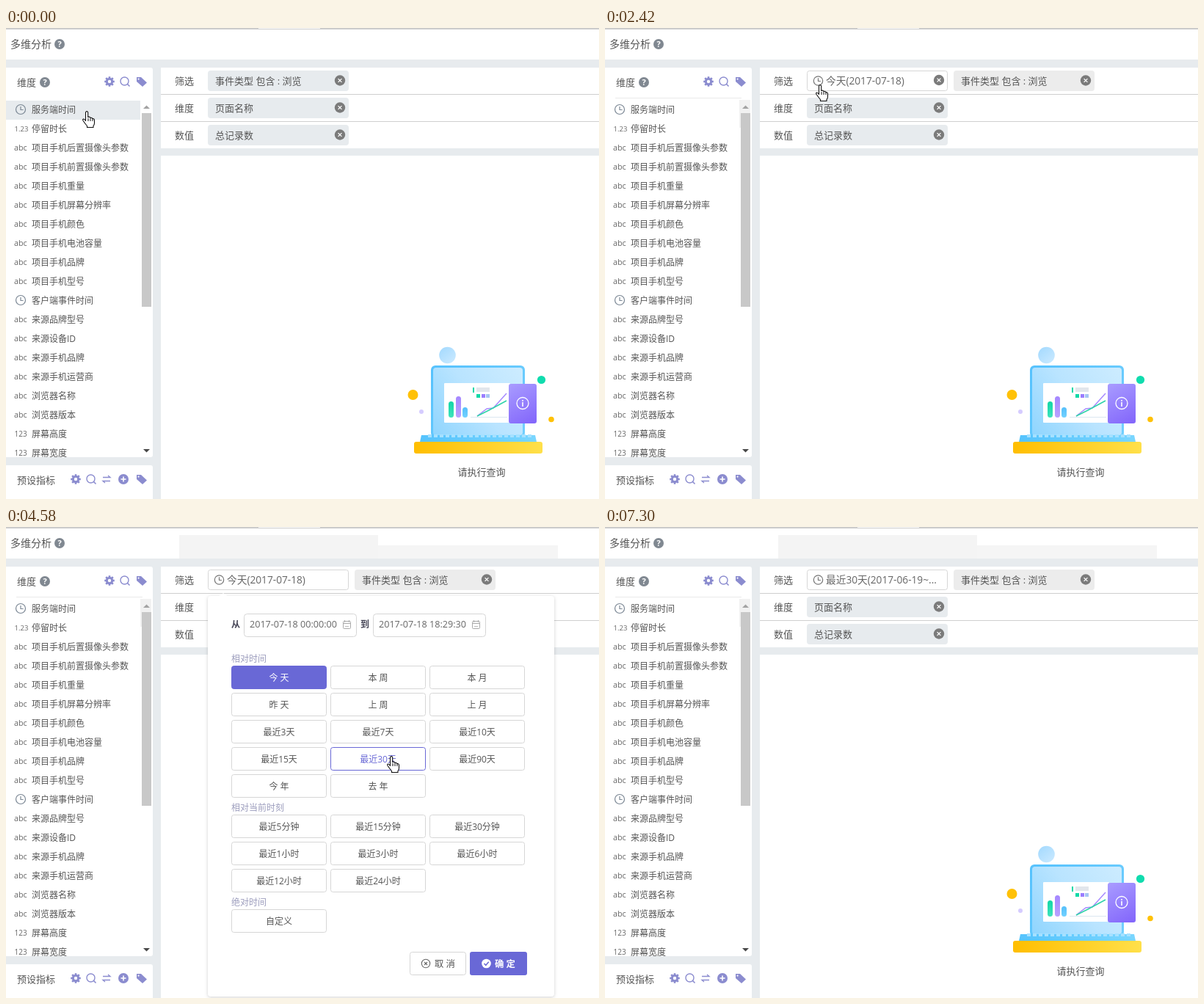
Write an HTML page with a canvas that moves like this. It is 808 px wide and 642 px high and loops after 7.85 s.

```html
<!DOCTYPE html>
<html lang="zh-CN">
<head>
<meta charset="utf-8">
<title>多维分析</title>
<style>
html, body { margin: 0; width: 100%; height: 100%; overflow: hidden; background: #fff; }
canvas { display: block; }
</style>
</head>
<body>
<canvas id="stage" width="808" height="642"></canvas>
<script>
const g = document.getElementById('stage').getContext('2d');
const LOOP = 7850;
const FONT = '"Open Sans", "Noto Sans CJK SC", "Noto Sans CJK", sans-serif';
const INK = '#555', LILAC = '#8b8ccf', PURPLE = '#6968d6', PALE = '#e7ebee', EDGE = '#d6d6d6';

// ---- helpers ----
function txt(s, x, cy, size = 12, color = INK, weight = 400, align = 'left') {
  g.font = `${weight} ${size}px ${FONT}`;
  g.textAlign = align;
  g.fillStyle = color;
  g.fillText(s, x, Math.round(cy + size * 0.37));
}
function rect(x, y, w, h, color) {
  g.fillStyle = color;
  g.fillRect(x, y, w, h);
}
function box(x, y, w, h, r, fill, line) {
  const o = line ? 0.5 : 0;
  g.beginPath();
  g.roundRect(x + o, y + o, w - 2 * o, h - 2 * o, r);
  if (fill) { g.fillStyle = fill; g.fill(); }
  if (line) { g.strokeStyle = line; g.lineWidth = 1; g.stroke(); }
}
function disc(x, y, r, color) {
  g.beginPath();
  g.arc(x, y, r, 0, 7);
  g.fillStyle = color;
  g.fill();
}
function ring(x, y, r, color, w = 1.2) {
  g.beginPath();
  g.arc(x, y, r, 0, 7);
  g.strokeStyle = color;
  g.lineWidth = w;
  g.stroke();
}
function line(color, w, ...p) {
  g.beginPath();
  for (let i = 0; i < p.length; i += 2) g.lineTo(p[i], p[i + 1]);
  g.strokeStyle = color;
  g.lineWidth = w;
  g.stroke();
}
function poly(color, ...p) {
  g.beginPath();
  for (let i = 0; i < p.length; i += 2) g.lineTo(p[i], p[i + 1]);
  g.fillStyle = color;
  g.fill();
}
function grad(x0, y0, x1, y1, ...stops) {
  const gr = g.createLinearGradient(x0, y0, x1, y1);
  stops.forEach((c, i) => gr.addColorStop(i / (stops.length - 1), c));
  return gr;
}
function cross(x, y, r, color, w) {
  line(color, w, x - r, y - r, x + r, y + r);
  line(color, w, x - r, y + r, x + r, y - r);
}

// ---- icons ----
function clock(x, y, r = 6.5, color = '#7b8794') {
  ring(x, y, r, color);
  line(color, 1.2, x, y - r * 0.6, x, y + 0.5, x + r * 0.55, y + 0.5);
}
function help(x, y) {
  disc(x, y, 7, '#808891');
  txt('?', x, y, 11, '#fff', 700, 'center');
}
function gear(x, y) {
  ring(x, y, 3.7, LILAC, 3);
  for (let i = 0; i < 8; i++) {
    const c = Math.cos(i * Math.PI / 4), s = Math.sin(i * Math.PI / 4);
    line(LILAC, 2.6, x + c * 4, y + s * 4, x + c * 6.8, y + s * 6.8);
  }
}
function search(x, y) {
  ring(x - 0.5, y - 0.5, 5.5, LILAC, 1.4);
  line(LILAC, 1.6, x + 3.5, y + 3.5, x + 6.5, y + 6.5);
}
function tag(x, y) {
  poly(LILAC, x - 6, y - 6, x, y - 6, x + 8, y + 1.5, x + 2, y + 7, x - 6, y);
  disc(x - 3.4, y - 3.4, 1.1, '#fff');
}
function swap(x, y) {
  line(LILAC, 1.3, x - 5, y - 2.5, x + 5, y - 2.5, x + 2, y - 5);
  line(LILAC, 1.3, x + 5, y + 2.5, x - 5, y + 2.5, x - 2, y + 5);
}
function plus(x, y) {
  disc(x, y, 7, LILAC);
  line('#fff', 1.6, x - 3.5, y, x + 3.5, y);
  line('#fff', 1.6, x, y - 3.5, x, y + 3.5);
}
function close(x, y) {
  disc(x, y, 7.2, '#7b7b7b');
  cross(x, y, 2.4, '#fff', 1.3);
}
function calendar(x, y) {
  box(x - 5, y - 5, 11, 11, 1, null, '#aaa');
  line('#aaa', 1, x - 5, y - 1.5, x + 6, y - 1.5);
  line('#aaa', 1, x - 2.5, y - 6, x - 2.5, y - 3);
  line('#aaa', 1, x + 3.5, y - 6, x + 3.5, y - 3);
  line('#bbb', 1, x - 2, y + 2.5, x + 3, y + 2.5);
}

// ---- cursors ----
const HAND = new Path2D('M4.5 13.5V2.2a1.6 1.6 0 0 1 3.2 0V8.5q2.8-1 3.2 1q2.6-.8 3 1.2q2.4-.4 2.6 1.6v4.2q0 2.5-1.5 3.8v2.2H6.5v-2Q3.5 17 1 13.2q-1-1.8 .6-2.2q1.4 0 2.9 2.5z');
const ARROW = new Path2D('M.5 .5V16.5L4.1 13L6.6 19L9 18L6.5 12.2H11.6Z');
function shape(path, x, y) {
  g.save();
  g.translate(x, y);
  g.lineJoin = 'round';
  g.fillStyle = '#fff';
  g.fill(path);
  g.strokeStyle = '#111';
  g.lineWidth = 1.1;
  g.stroke(path);
  g.restore();
}
const cursors = {
  hand(x, y) {
    shape(HAND, x - 6, y);
    for (const dx of [2, 5, 8]) line('#111', 1, x + dx, y + 10, x + dx, y + 14);
  },
  arrow(x, y) { shape(ARROW, x, y); },
  copy(x, y) {
    rect(x + 2, y + 16, 12, 8, '#fff');
    g.setLineDash([2, 1]);
    g.strokeStyle = '#222';
    g.lineWidth = 1;
    g.strokeRect(x + 2.5, y + 16.5, 11, 7);
    g.setLineDash([]);
    shape(ARROW, x, y);
  },
  deny(x, y) {
    ring(x, y, 8, '#fff', 4.5);
    line('#fff', 4.5, x - 5.5, y - 5.5, x + 5.5, y + 5.5);
    ring(x, y, 8, '#111', 2.4);
    line('#111', 2.4, x - 5.5, y - 5.5, x + 5.5, y + 5.5);
  },
  none() {}
};
const track = [
  [0, 'hand', 110, 113], [960, 'deny', 122, 109], [1110, 'deny', 163, 97], [1240, 'deny', 199, 87],
  [1380, 'copy', 227, 83], [1500, 'copy', 248, 80], [1900, 'arrow', 248, 80], [2290, 'arrow', 268, 78],
  [2420, 'hand', 293, 77], [2540, 'hand', 308, 77], [2700, 'hand', 321, 77],
  [3800, 'arrow', 366, 94], [3930, 'arrow', 406, 116], [4070, 'arrow', 466, 172], [4190, 'arrow', 521, 224],
  [4340, 'hand', 523, 246], [4460, 'hand', 524, 281], [4580, 'hand', 525, 312], [4730, 'hand', 526, 314],
  [5810, 'arrow', 601, 368], [5960, 'arrow', 636, 470], [6090, 'arrow', 667, 571], [6240, 'hand', 670, 591],
  [6920, 'arrow', 669, 591], [7060, 'arrow', 708, 592], [7190, 'arrow', 750, 593], [7300, 'none', 0, 0]
];
const at = (list, t) => list.findLast(e => e[0] <= t);

// ---- page ----
const fields = ['@服务端时间', '1.23 停留时长', '项目手机后置摄像头参数', '项目手机前置摄像头参数', '项目手机重量',
  '项目手机屏幕分辨率', '项目手机颜色', '项目手机电池容量', '项目手机品牌', '项目手机型号', '@客户端事件时间',
  '来源品牌型号', '来源设备ID', '来源手机品牌', '来源手机运营商', '浏览器名称', '浏览器版本', '123 屏幕高度', '123 屏幕宽度'];

function header(t) {
  rect(0, 0, 808, 642, PALE);
  rect(0, 0, 808, 43, '#fff');
  rect(0, 0, 808, 2, '#cbcbcb');
  rect(344, 0, 84, 1, '#fff');
  if (t >= 3280) rect(505, 25, t < 3400 ? 243 : 247, 18, '#f5f5f5');
  if (t >= 4190) rect(236, 11, 271, 32, '#f4f4f4');
  txt('多维分析', 6, 22, 14);
  help(73, 22);
}
function sidebar(t) {
  box(-4, 54, 204, 531, 3, '#fff');
  txt('维度', 15, 74, 13);
  help(53, 74);
  gear(141, 73);
  search(162, 73);
  tag(184, 73);
  if (t >= 960) rect(t < 1900 ? 23 : 14, 95, t < 1900 ? 112 : 172, 1, '#e9e9e9');
  if (t < 2020) rect(0, 99, 183, 26, t < 960 ? PALE : t < 1900 ? '#dfdfdf' : '#f2f2f2');

  g.save();
  g.beginPath();
  g.rect(0, 97, 200, 488);
  g.clip();
  fields.forEach((f, i) => {
    const y = 112 + i * 26;
    const m = f.match(/^([\d.]+) (.*)/);
    if (f[0] === '@') clock(20, y - 1);
    else if (m) txt(m[1], 11.5, y - 1, m[1].length > 3 ? 9.5 : 10, '#666');
    else txt('abc', 11, y - 1, 10.8, '#666');
    txt(m ? m[2] : f.replace('@', ''), 35, y);
  });
  g.restore();

  if (t >= 960) rect(183, 98, 15, 38, '#f1f1f1');
  rect(185, 116, 13, 264, '#c8c8c8');
  poly('#a3a3a3', 187, 110, 191.5, 105.5, 196, 110);
  poly('#484848', 187, 574, 196, 574, 191.5, 578.5);

  box(-4, 596, 204, 60, 3, '#fff');
  txt('预设指标', 15, 616, 13);
  gear(95, 615);
  search(116, 615);
  swap(137, 615);
  plus(160, 615);
  tag(184, 615);
}
function pill(x, y, label, fill = PALE) {
  box(x, y, 192, 28, 4, fill);
  txt(label, x + 10, y + 14, 13);
  close(x + 180, y + 13.5);
}
function filters(t) {
  rect(211, 54, 597, 110, '#fff');
  rect(211, 90, 597, 1, '#cfcfcf');
  rect(211, 127, 597, 1, '#cfcfcf');
  rect(211, 174, 597, 468, '#fff');
  ['筛选', '维度', '数值'].forEach((s, i) => txt(s, 230, 72 + i * 37, 13));
  pill(275, 95, '页面名称');
  pill(275, 132, '总记录数');
  const event = '事件类型 包含 : 浏览';
  if (t < 1900) return pill(275, 58, event);
  pill(475, 58, event, '#ececec');
  box(275, 58, 192, 28, 3, '#fff', EDGE);
  clock(290.5, 72, 6.2, '#777');
  txt(t < 5290 ? '今天(2017-07-18)' : '最近30天(2017-06-19~...', 301, 72, 13.7, '#666');
  if (t >= 2420 && t < 3800) close(455, 71);
}
function picture() {
  disc(601.5, 446, 11.3, grad(592, 436, 610, 457, '#a5dafe', '#c9e9ff'));
  disc(554.5, 500, 7, '#ffc107');
  disc(566, 523, 3, '#d5ccff');
  disc(729.5, 479.5, 5.6, '#10dcae');
  disc(743, 533.5, 3.8, '#ffc107');

  // laptop lid and window
  box(579, 460, 128, 98, 6, grad(579, 460, 707, 555, '#56c2fd', '#72cffe'));
  box(582, 463, 122, 92, 4, grad(582, 555, 704, 463, '#8fd5fe', '#b9e4ff', '#cdecff'));
  box(597, 484, 90, 54, 1, '#fff');

  // bars and lines
  box(603, 509, 7, 22, 3.5, grad(0, 509, 0, 531, '#12d6a6', '#3fe3bb'));
  box(613, 502, 7, 29, 3.5, grad(0, 502, 0, 531, '#a587ff', '#b9a2ff'));
  box(622, 517, 7, 14, 3.5, grad(0, 517, 0, 531, '#55bffb', '#72d2ff'));
  rect(636, 490, 2, 7, '#10d9a8');
  rect(641, 490, 18, 6, '#e2e6ec');
  rect(641, 499, 5, 5, '#10d9a8');
  rect(648, 499, 5, 5, '#9a7dff');
  rect(654, 499, 5, 5, '#a6c6f3');
  line('#dbe7f1', 1, 633, 530.5, 683, 530.5);
  line('#a78bff', 1.5, 642, 529, 655, 519, 664, 518, 682, 498);
  line('#2ed3a9', 1.5, 642, 529, 658, 521, 682, 508);

  // keyboard and desk
  poly(grad(564, 0, 723, 0, '#55c3fd', '#7ad6ff'), 566, 555, 721, 555, 723, 564, 564, 564);
  for (let x = 575; x < 714; x += 8) rect(x, 554, 5, 4, '#a6e1ff');
  box(556, 564, 175, 16, 3, grad(556, 0, 731, 0, '#ffbe00', '#ffe04a'));

  box(685, 485, 38, 54, 3, grad(685, 485, 715, 539, '#a99cff', '#8468fb'));
  ring(704, 511.5, 8, '#fff', 1.3);
  rect(703.2, 507, 1.6, 1.8, '#fff');
  rect(703.2, 510, 1.6, 6, '#fff');
  txt('请执行查询', 648, 605.5, 13, INK, 400, 'center');
}

// ---- overlays ----
function ghost(x, y) {
  const r = v => `rgba(226,226,226,${v})`;
  rect(x, y, 163, 20, grad(x, 0, x + 163, 0, r(0.85), r(0.72), r(0.25)));
  clock(x + 10, y + 9, 6.5, '#9a9a9a');
  txt('服务端时间', x + 24, y + 10.5, 12, '#888');
}
function dropMark() {
  rect(268, 45, 6, 6, INK);
  poly(INK, 264.5, 51, 277.5, 51, 271, 58.5);
}
function tooltip(alpha, scale) {
  g.save();
  g.globalAlpha = alpha;
  g.translate(371.5, 47);
  g.scale(scale, scale);
  g.translate(-371.5, -47);
  box(239, 12, 265, 34, 4, '#555');
  poly('#555', 366, 46, 377, 46, 371.5, 51);
  txt('2017-07-18 00:00:00~2017-07-18 18:29:30', 371.5, 29.5, 12.6, '#fff', 700, 'center');
  g.restore();
}

const groups = [
  ['相对时间', 180, 189, ['今 天', '本 周', '本 月', '昨 天', '上 周', '上 月', '最近3天', '最近7天', '最近10天',
    '最近15天', '最近30天', '最近90天', '今 年', '去 年']],
  ['相对当前时刻', 383, 392, ['最近5分钟', '最近15分钟', '最近30分钟', '最近1小时', '最近3小时', '最近6小时', '最近12小时', '最近24小时']],
  ['绝对时间', 512, 521, ['自定义']]
];
const hovers = [[0, ''], [4340, '上 周'], [4460, '最近7天'], [4580, '最近30天']];

function look(name, t) {
  const on = [PURPLE, PURPLE, '#fff'];
  if (name === '今 天') {
    if (t < 5290) return on;
    if (t < 5410) return ['#8e8de0', '#8685dc', '#c9c9f2'];
  }
  if (name === '最近30天' && t >= 5290) return t < 5410 ? ['#d9d9f5', '#5754b8', '#777'] : on;
  return at(hovers, t)[1] === name ? ['#fff', PURPLE, PURPLE] : ['#fff', EDGE, INK];
}
function option(name, x, y, t) {
  const [fill, edge, ink] = look(name, t);
  if (name === '最近30天' && t >= 5290 && t < 5410) box(x - 2, y - 2, 134, 36, 5, '#e1e1f7');
  box(x, y, 130, 32, 3, fill, edge);
  txt(name, x + 65, y + 16.5, 12, ink, 400, 'center');
}
function dateField(x, value) {
  box(x, 118, 154, 32, 4, '#fff', EDGE);
  txt(value, x + 8, 132, 12.6, '#666');
  calendar(x + 140, 133);
}
function panel(t) {
  g.save();
  if (t < 3400) {
    g.globalAlpha = 0.94;
    g.translate(275, 94);
    g.scale(0.992, 0.992);
    g.translate(-275, -94);
  }
  g.save();
  g.shadowColor = 'rgba(0,0,0,.18)';
  g.shadowBlur = 4;
  g.shadowOffsetY = 1;
  box(275, 94, 472, 546, 4, '#fff');
  g.restore();
  poly('#fff', 289, 95, 296, 90, 303, 95);

  txt('从', 307, 133, 12, '#445', 700);
  txt('到', 483, 133, 12, '#445', 700);
  dateField(324, t < 5290 ? '2017-07-18 00:00:00' : '2017-06-19 00:00:00');
  dateField(500, t < 5290 ? '2017-07-18 18:29:30' : '2017-07-18 18:29:32');

  for (const [label, labelY, top, names] of groups) {
    txt(label, 307, labelY, 12, '#9c9dbd');
    names.forEach((n, i) => option(n, 307 + i % 3 * 135, top + Math.floor(i / 3) * 37, t));
  }

  box(550, 579, 77, 32, 3, '#fff', EDGE);
  ring(572, 595, 5.7, '#666', 1.1);
  cross(572, 595, 2, '#666', 1.1);
  txt('取 消', 598, 595.5, 12.4, INK, 400, 'center');
  box(632, 579, 78, 32, 3, PURPLE);
  disc(654.5, 595, 6.3, '#fff');
  line(PURPLE, 1.5, 651.5, 595, 653.8, 597.3, 657.7, 592.8);
  txt('确 定', 680, 595.5, 12.4, '#fff', 700, 'center');
  g.restore();
}

function draw(t) {
  header(t);
  sidebar(t);
  filters(t);
  picture();
  if (t >= 3280 && t < 6920) panel(t);
  if (t >= 2540 && t < 4190) {
    if (t < 2700) tooltip(0.3, 0.96);
    else if (t < 4070) tooltip(1, 1);
    else tooltip(0.5, 0.98);
  }
  const [, kind, x, y] = at(track, t);
  if (t >= 1380 && t < 1900) dropMark();
  if (t >= 960 && t < 1900) ghost(x - 99, y - 11);
  cursors[kind](x, y);
}

const start = performance.now();
function tick() {
  draw((performance.now() - start) % LOOP);
  requestAnimationFrame(tick);
}
tick();
</script>
</body>
</html>
```
